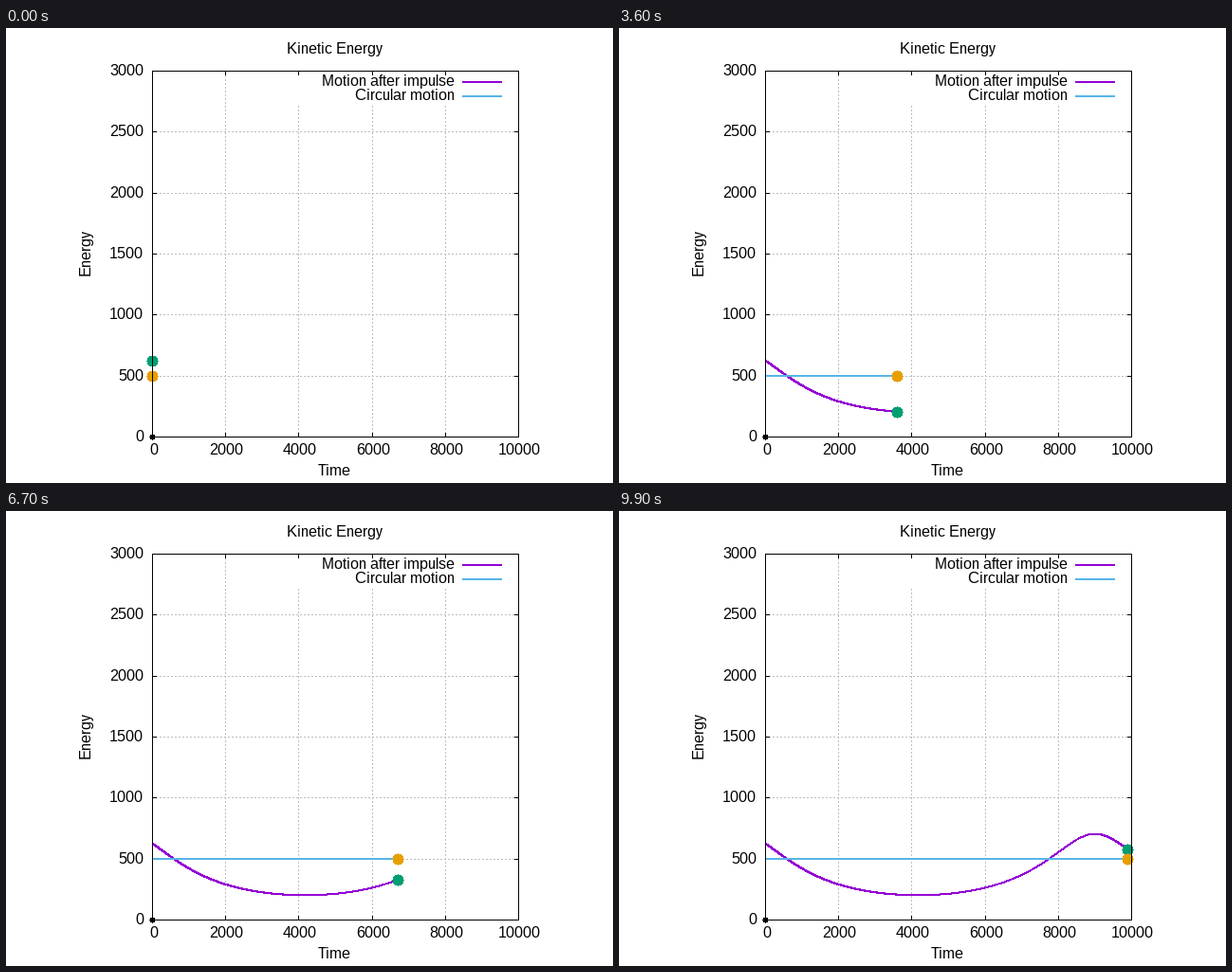
Animation, 640 px wide and 480 px high, one loop 10000 ms. Source, as a matplotlib script:

```python
import numpy as np
import matplotlib.pyplot as plt
from matplotlib.animation import FuncAnimation
from matplotlib.patches import Polygon

plt.rcParams["font.family"] = "Liberation Sans"
plt.rcParams["text.hinting"] = "default"
plt.rcParams["text.hinting_factor"] = 1     # whole-pixel letter spacing
plt.rcParams["path.snap"] = False

W, H, DPI = 640, 480, 100
PX = 72 / DPI                       # points per pixel
LEFT, RIGHT, TOP, BOTTOM = 154, 540, 45, 431
TIC = 5
T_MAX, E_MAX = 10000, 3000
FRAMES, STEP = 100, 100

PURPLE, GREEN, BLUE, ORANGE = "#9400d3", "#009e73", "#56b4e9", "#e69f00"
GRID = "#bebebe"

# Orbit in units of the circular one: radius 1, speed 1, mass 1000
MASS, V_TAN, V_RAD = 1000, 1.1, 0.2
SEMI = 1 / (2 - V_TAN**2 - V_RAD**2)
ECC = np.sqrt(1 - V_TAN**2 / SEMI)
RATE = SEMI**-1.5 / 1000
ECC_ANOM0 = np.arccos((1 - 1 / SEMI) / ECC)
MEAN0 = ECC_ANOM0 - ECC * np.sin(ECC_ANOM0)
E_CIRC = MASS / 2


def orbit_energy(t):
    """Kinetic energy on the ellipse, from Kepler's equation."""
    mean = MEAN0 + RATE * np.asarray(t, float)
    anom = mean + ECC * np.sin(mean)
    for _ in range(8):
        anom -= (anom - ECC * np.sin(anom) - mean) / (1 - ECC * np.cos(anom))
    radius = SEMI * (1 - ECC * np.cos(anom))
    return MASS * (1 / radius - 0.5 / SEMI)


def x_px(t):
    return LEFT + np.floor(np.asarray(t) * (RIGHT - LEFT) / T_MAX + 0.5)


def y_px(e):
    return BOTTOM - np.floor(np.asarray(e) * (BOTTOM - TOP) / E_MAX + 0.5)


def disc(r):
    """Stepped outline of a pixel disc around the pixel at (0, 0)."""
    right = []
    for dy in range(-r, r + 1):
        w = int(np.sqrt(r * r - dy * dy)) + 1
        right += [(w, dy), (w, dy + 1)]
    left = [(1 - x, y) for x, y in reversed(right)]
    return np.array(right + left, float)


def curve_band(now):
    """Stepped outline of a two-pixel pen following the orbit's energy."""
    t = np.arange(0, now + 1, 2)
    y = y_px(orbit_energy(t))
    cols, start = np.unique(x_px(t), return_index=True)
    top = np.minimum.reduceat(y, start) - 1
    low = np.maximum.reduceat(y, start) + 1
    low[:-1] = np.maximum(low[:-1], low[1:])   # pen reaches one pixel back
    xs = np.column_stack([cols, cols + 1]).ravel()
    upper = np.column_stack([xs, np.repeat(top, 2)])
    lower = np.column_stack([xs, np.repeat(low, 2)])
    return np.vstack([upper, lower[::-1]])


fig = plt.figure(figsize=(W / DPI, H / DPI), dpi=DPI, facecolor="white")
ax = fig.add_axes([0, 0, 1, 1])
ax.set_xlim(0, W)
ax.set_ylim(H, 0)
ax.axis("off")


def line(xs, ys, color="black", width=1, z=1, **kw):
    return ax.plot(xs, ys, color=color, lw=width * PX, zorder=z,
                   solid_capstyle="butt", dash_capstyle="butt", **kw)[0]


def label(x, y, s, ha="center", **kw):
    ax.text(x, y, s, ha=ha, va="baseline", fontsize=16 * PX,
            color="black", zorder=9, **kw)


def blob(xy, color, z):
    shape = Polygon(xy, closed=True, fc=color, ec="none", lw=0,
                    antialiased=False, zorder=z)
    return ax.add_patch(shape)


# Grid, tics and tic labels
dots = dict(color=GRID, z=0, dashes=(2, 2))
for t in range(0, T_MAX + 1, 2000):
    x = x_px(t) + 0.5
    if 0 < t < T_MAX:
        end = 80 if t > 2000 else TOP          # stop below the key
        line([x, x], [BOTTOM + 1, end], **dots)
        line([x, x], [BOTTOM + 1 - TIC, BOTTOM])
        line([x, x], [TOP, TOP + TIC])
    label(x + 1, 450, str(t))
for e in range(0, E_MAX + 1, 500):
    y = y_px(e) + 0.5
    if 0 < e < E_MAX:
        line([LEFT, RIGHT], [y, y], **dots)
        line([LEFT, LEFT + TIC], [y, y])
        line([RIGHT + 1 - TIC, RIGHT], [y, y])
    label(145, y + 4.5, str(e), ha="right")

# Border lies over the moving dots
x0, x1, y0, y1 = LEFT + 0.5, RIGHT + 0.5, TOP + 0.5, BOTTOM + 0.5
line([x0, x1, x1, x0, x0, x1], [y0, y0, y1, y1, y0, y0], z=8)

label(346.5, 27, "Kinetic Energy")
label(346.5, 472, "Time")
label(89, 236.5, "Energy", rotation=90, rotation_mode="anchor")

# Key
for y, name, color in ((57, "Motion after impulse", PURPLE),
                       (72, "Circular motion", BLUE)):
    label(473, y + 4, name, ha="right")
    line([481, 523], [y, y], color, 2)

DOT = disc(6)
orbit = blob(curve_band(0), PURPLE, 2)
orbit_dot = blob(DOT, GREEN, 3)
circle = line([], [], BLUE, 2, 4)
circle_dot = blob(DOT, ORANGE, 5)
blob(disc(3) + (LEFT, BOTTOM), "black", 6)


def draw(i):
    now = i * STEP
    x = x_px(now)
    orbit.set_xy(curve_band(now))
    orbit_dot.set_xy(DOT + (x, y_px(orbit_energy(now))))
    circle.set_data([LEFT, x], [y_px(E_CIRC)] * 2)
    circle_dot.set_xy(DOT + (x, y_px(E_CIRC)))
    return orbit, orbit_dot, circle, circle_dot


anim = FuncAnimation(fig, draw, frames=FRAMES, init_func=lambda: draw(0),
                     interval=100, repeat=True, repeat_delay=0, blit=False)
plt.show()
```
